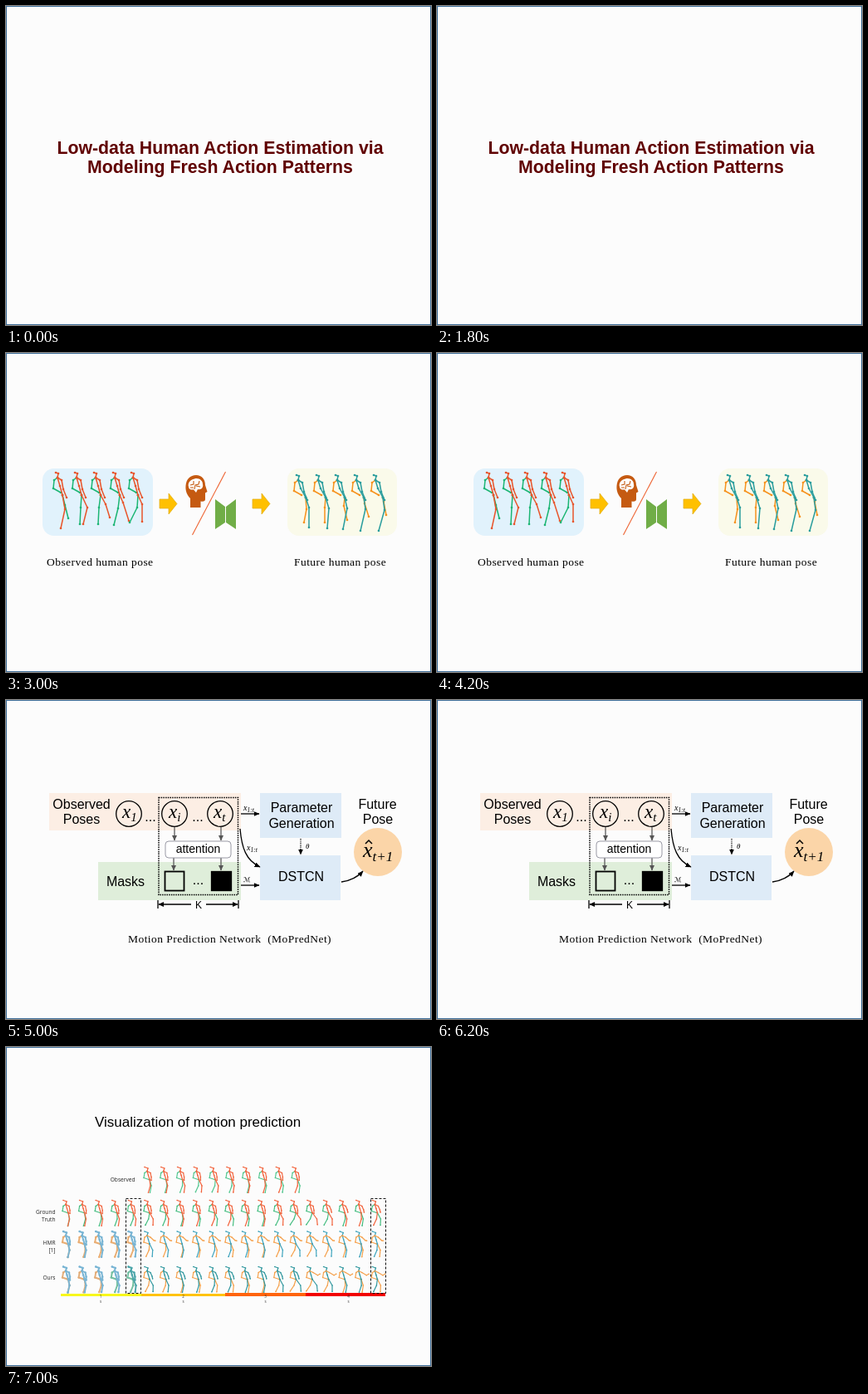
An HTML page for the animation above (9 s loop, 512 px wide and 384 px high).

```html
<!DOCTYPE html>
<html lang="en">
<head>
<meta charset="utf-8">
<title>Motion prediction</title>
<style>
html, body { margin: 0; width: 100%; height: 100%; overflow: hidden; background: #fcfcfc; }
svg { display: block; width: 100vw; height: 100vh; }
text { font-family: "Liberation Sans", Arial, sans-serif; white-space: pre; }
.scene { visibility: hidden; animation: show 9s step-end infinite; }
#title { animation-name: show-long; }
#poses { animation-delay: -6s; }
#network { animation-delay: -4s; }
#results { animation-delay: -2s; }
@keyframes show { 0% { visibility: visible; } 22.222222%, 100% { visibility: hidden; } }
@keyframes show-long { 0% { visibility: visible; } 33.333333%, 100% { visibility: hidden; } }
#title text { font-size: 21.3px; font-weight: bold; fill: #600000; text-anchor: middle; }
text.cap { font: 13.5px "Liberation Serif", "Times New Roman", serif; letter-spacing: .45px; }
#network text { font-size: 16px; }
#network .math, .math text { font-family: "Liberation Serif", "Times New Roman", serif; font-style: italic; }
.mid text, text.mid { text-anchor: middle; }
.labels text { font: 6.6px "Open Sans", "Noto Sans", sans-serif; text-anchor: end; fill: #222; }
.ticks text { font: 4.5px "Open Sans", "Noto Sans", sans-serif; text-anchor: middle; fill: #333; }
.limb { fill: none; stroke-linejoin: round; stroke-linecap: round; }
</style>
</head>
<body>
<svg viewBox="0 0 512 384" preserveAspectRatio="none">
<defs>
  <marker id="tip" markerUnits="userSpaceOnUse" markerWidth="8" markerHeight="7" refX="6.5" refY="3" orient="auto"><path d="M0 0L7 3L0 6Z"/></marker>
  <marker id="gray" markerUnits="userSpaceOnUse" markerWidth="8" markerHeight="7" refX="6" refY="3" orient="auto"><path d="M0 0L6.5 3L0 6Z" fill="#555"/></marker>
  <marker id="end" markerUnits="userSpaceOnUse" markerWidth="8" markerHeight="7" refX="6" refY="3" orient="auto-start-reverse"><path d="M0 0L6.5 3L0 6Z"/></marker>
  <path id="block" d="M0 7H11V0L21 12.5L11 25V18H0Z" fill="#ffc000" stroke="#e0ac12" stroke-width=".7"/>
</defs>
<rect width="512" height="384" fill="#fcfcfc"/>

<g id="title" class="scene">
  <text x="258" y="178">Low-data Human Action Estimation via</text>
  <text x="258" y="201">Modeling Fresh Action Patterns</text>
</g>

<g id="poses" class="scene">
  <rect x="44" y="139" width="133" height="81" rx="14" fill="#e1f2fc"/>
  <rect x="339" y="139" width="132" height="81" rx="14" fill="#fafaea"/>
  <g id="figures"></g>
  <use href="#block" x="185" y="169"/>
  <use href="#block" x="297" y="169"/>
  <path d="M222 186V175C218 171 216 166 216.500 160C217 152 222 147 229 147C236 147 240 152 240 159L242.500 167L240 168.500V176C240 178.500 238 179 234.500 178.500V186Z" fill="#c55a11"/>
  <path d="M220 161C218.500 157 222 152 227 151.500C232 150 237 153 237 158C238 162 235 165 231 164L229 168L226 164.500C223 165 220 164 220 161Z" fill="#fff"/>
  <path d="M222 159l4-1v-4M227 164l1-5 4-1 1-4M229 160l5 1M222 162l4 0" fill="none" stroke="#c55a11" stroke-width="1.1"/>
  <path d="M264.500 143L224.500 219" stroke="#ee6534" stroke-width="1.1"/>
  <path d="M252 176L264 185V204L252 212ZM277 176L265 185V204L277 212Z" fill="#70ad47"/>
  <text class="cap" x="49" y="256">Observed human pose</text>
  <text class="cap" x="347" y="256">Future human pose</text>
</g>

<g id="network" class="scene">
  <rect x="52" y="112" width="231" height="45" fill="#fceee4"/>
  <rect x="111" y="195" width="172" height="46" fill="#dfeeda"/>
  <rect x="306" y="112" width="98" height="54" fill="#deebf7"/>
  <rect x="306" y="187" width="97" height="54" fill="#deebf7"/>
  <circle cx="448" cy="183" r="29" fill="#fbd5a8"/>
  <g class="mid">
    <text x="91" y="131">Observed</text><text x="91" y="149">Poses</text>
    <text x="144" y="224">Masks</text>
    <text x="356" y="135">Parameter</text><text x="356" y="154">Generation</text>
    <text x="355.500" y="218">DSTCN</text>
    <text x="447.500" y="131">Future</text><text x="448" y="149">Pose</text>
    <text x="174" y="146">...</text><text x="231" y="146">...</text><text x="231.500" y="222">...</text>
  </g>
  <g fill="none" stroke="#000" stroke-width="1.3">
    <circle cx="148" cy="137" r="15.300"/><circle cx="203" cy="137" r="15.300"/><circle cx="258" cy="137" r="15.300"/>
    <rect x="184" y="117.500" width="95.500" height="117" stroke-width="1.500" stroke-dasharray="1.5 1.2"/>
    <rect x="191.500" y="206.500" width="23" height="23" stroke-width="1.800"/>
    <rect x="247.500" y="206.500" width="24" height="23" fill="#000"/>
  </g>
  <g class="math">
    <text x="140" y="142" style="font-size:23px">x<tspan dy="4" font-size="15">1</tspan></text>
    <text x="196" y="142" style="font-size:23px">x<tspan dy="4" font-size="15">i</tspan></text>
    <text x="250" y="142" style="font-size:23px">x<tspan dy="4" font-size="15">t</tspan></text>
    <text x="430" y="189" style="font-size:26px">x<tspan dy="5" font-size="17">t+1</tspan></text>
    <text x="286" y="133" style="font-size:10px">x<tspan dy="2" font-size="7.5">1:t</tspan></text>
    <text x="290" y="181" style="font-size:10px">x<tspan dy="2" font-size="7.5">1:t</tspan></text>
    <text x="361" y="179" style="font-size:9px">θ</text>
    <text x="286" y="219" style="font:8px 'DejaVu Sans',sans-serif">ℳ</text>
  </g>
  <path d="M433 173l4-4 4 4" fill="none" stroke="#000" stroke-width="1.500"/>
  <g stroke="#666" stroke-width="1.400" marker-end="url(#gray)">
    <path d="M203 153V169" marker-end="url(#gray)"/><path d="M259 153V169" marker-end="url(#gray)"/>
    <path d="M202 190V205" marker-end="url(#gray)"/><path d="M259 190V205" marker-end="url(#gray)"/>
  </g>
  <rect x="192" y="170" width="79" height="20" rx="4" fill="#fff" stroke="#9a9aa5"/>
  <text class="mid" x="231.500" y="184" style="font-size:14px">attention</text>
  <g fill="none" stroke="#000" stroke-width="1.300">
    <path d="M283 137H305" marker-end="url(#tip)"/>
    <path d="M282 155C284 178 289 193 306 201" marker-end="url(#tip)"/>
    <path d="M283 223H305" marker-end="url(#tip)"/>
    <path d="M404 219Q420 217 430 206" marker-end="url(#tip)"/>
    <path d="M355 167V186" stroke-dasharray="1.2 1.2" marker-end="url(#tip)"/>
    <path d="M183 241V251M280 241V251"/>
    <path d="M223 246H184" marker-end="url(#end)"/><path d="M241 246H279" marker-end="url(#end)"/>
  </g>
  <text class="mid" x="232" y="250.500" style="font-size:12px">K</text>
  <text class="cap" x="147" y="292" style="font-size:13.5px">Motion Prediction Network  (MoPredNet)</text>
</g>

<g id="results" class="scene">
  <text x="107" y="96" font-size="17">Visualization of motion prediction</text>
  <g class="labels">
    <text x="155.500" y="162">Observed</text>
    <text x="59.500" y="201">Ground</text><text x="59.500" y="210">Truth</text>
    <text x="59.500" y="238">HMR</text><text x="59.500" y="247">[1]</text>
    <text x="59.500" y="280">Ours</text>
  </g>
  <g id="rows"></g>
  <path d="M66 298.500H164" stroke="#f7f71c" stroke-width="3"/>
  <path d="M163 298.500H264" stroke="#ffc310" stroke-width="3"/>
  <path d="M264 298H361" stroke="#ff640c" stroke-width="4"/>
  <path d="M361 298H457" stroke="#f20000" stroke-width="4"/>
  <g class="ticks">
    <text x="114" y="302">1</text><text x="213.500" y="302">2</text><text x="312.500" y="302">3</text><text x="412.500" y="302">4</text>
    <text x="114" y="308">s</text><text x="213.500" y="308">s</text><text x="312.500" y="308">s</text><text x="412.500" y="308">s</text>
  </g>
  <g fill="none" stroke="#111" stroke-dasharray="3 2">
    <rect x="144.500" y="182.500" width="18" height="114"/>
    <rect x="439.500" y="182.500" width="18" height="114"/>
  </g>
</g>
<rect x=".5" y=".5" width="511" height="383" fill="none" stroke="#41719c"/>
</svg>
<script>
const el = id => document.getElementById(id);

// One jointed limb; points are offsets from (x, y).
function limb(x, y, pts, color, w, r) {
  const p = pts.map(([a, b]) => [+(x + a).toFixed(1), +(y + b).toFixed(1)]);
  return `<polyline class="limb" points="${p.join(' ')}" stroke="${color}" stroke-width="${w}"/>` +
    p.map(([a, b]) => `<circle cx="${a}" cy="${b}" r="${r}" fill="${color}"/>`).join('');
}

const RED = '#e8552b', GREEN = '#1bb573', ORANGE = '#f6921e', TEAL = '#2a9d9d';

// x, then knee and foot of the near-side leg, then of the far-side leg
const observed = [
  [61, 10, 39, 14, 55, 10, 44, 5, 67],
  [84, 6, 42, 5, 62, 14, 42, 9, 62],
  [107, 5, 42, 4, 62, 13, 38, 18, 54],
  [130, 5, 43, 0, 63, 11, 36, 18, 58],
  [152, 6, 42, -3, 60, 12, 38, 12, 59]
];
const future = [
  [351, 11, 41, 8, 57, 14, 39, 14, 63],
  [375, 9, 39, 9, 57, 14, 40, 12, 64],
  [398, 9, 37, 13, 54, 13, 40, 8, 65],
  [421, 11, 34, 16, 50, 12, 41, 6, 67],
  [444, 11, 32, 14, 48, 12, 42, 5, 67]
];

function walkers(list, y, near, far, dx) {
  return list.map(([x, a, b, c, d, e, f, g, h]) => {
    const draw = (pts, col) => limb(x, y, pts, col, 1.5, 1.35);
    return draw([[1, 6], [-3, 9], [-4, 19], [5, 24]], near) +
      draw([[6 + dx, 27], [a, b], [c, d]], near) +
      draw([[6 + dx, 27], [e, f], [g, h]], far) +
      draw([[-1, 0], [2, 1], [1, 6], [4, 16], [6 + dx, 27]], far) +
      draw([[1, 6], [6, 9], [8, 20], [12, 30]], far);
  }).join('');
}
el('figures').innerHTML = walkers(observed, 144, GREEN, RED, 1) + walkers(future, 147, ORANGE, TEAL, 4);

function small(x, y, near, far, swing, reach, w = 1.2) {
  const draw = (pts, col) => limb(x, y, pts, col, w, w * .65);
  const leg = s => [[3, 15], [4.5 + s * .6, 22.5], [2.5 + s, 31 - Math.abs(s) * .25]];
  return draw([[0, 5], [-3, 7], [-4, 13], [2, 15]], near) +
    draw(leg(-swing), near) + draw(leg(swing), far) +
    draw([[-3, 0], [1, 1.5], [0, 5], [1.5, 10], [3, 15]], far) +
    draw([[0, 5], [4, 7], [5 + reach, 12 - reach * .4], [5 + reach * 1.6, 16 - reach * 1.6]], reach > 2 ? near : far);
}

const step = 19.6, gait = i => 1 + 5 * Math.sin(i * .62 - 1.2);
let out = '';
for (let i = 0; i < 10; i++) out += small(170 + i * 19.8, 144.5, '#52c68f', '#f2633c', gait(i + 1) * .6, 0);
for (let i = 0; i < 20; i++) {
  const x = 72 + i * step, past = i < 5;
  const s = past ? i * .7 : gait(i) * (i > 11 ? 1.15 : .8);
  out += small(x, 184.500, '#45bd80', '#f2633c', s, i > 15 ? 1 : 0);
  if (past) {
    out += small(x, 222, '#e9ad72', '#79b5d4', s, 0, 1.9);
    out += small(x, 264.500, i > 2 ? '#72bfa0' : '#e3ad79', i > 3 ? '#4ba5a9' : '#79b5d4', s, 0, 1.9);
  } else {
    out += small(x, 222, '#f5a04b', '#3fa4bd', s * .8, 3);
    out += small(x, 264.500, '#f5a04b', '#32989f', s, i > 14 ? 4.5 : 1);
  }
}
el('rows').innerHTML = out;
</script>
</body>
</html>
```
